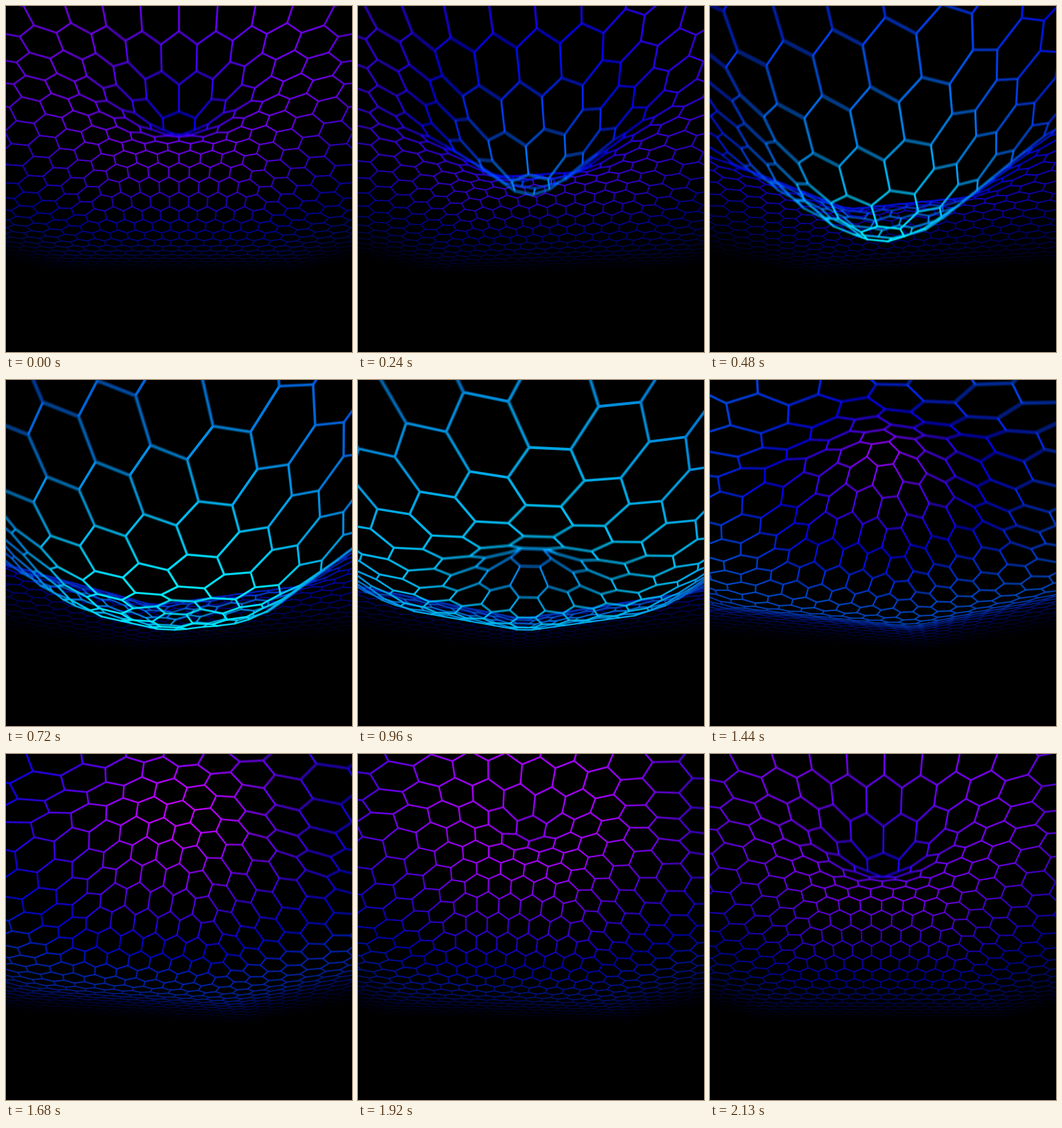
Recreate the animation shown at these times as an HTML page with a canvas. Size 500 px wide and 500 px high, loop 2160 ms.

```html
<!DOCTYPE html>
<html lang="en">
<head>
<meta charset="utf-8">
<title>Rippling honeycomb</title>
<style>
  html, body { margin: 0; width: 100%; height: 100%; overflow: hidden; background: #000; }
  canvas { display: block; width: 100vw; height: 100vh; }
</style>
</head>
<body>
<canvas id="stage" width="500" height="500"></canvas>
<script>
const SIZE = 500, STEPS = 72, STEP_MS = 30;
const RADIUS = 33;             // mesh radius, in hexagon sides
const FOCAL = 433;             // camera distance, px
const TILT = Math.PI / 3;
const SCALE = 27.15;           // px per hexagon side at the pivot
const LIFT = -2.18;            // pivot above the screen centre, in sides
const AMP = 4.95;              // wave height on screen, in sides
const SPREAD = 12.3;           // how far the wave carries, in sides
const LAG = 9.6 * Math.PI / 180; // wave phase per side
const SAMPLES = 3, SHUTTER = 0.3;

const cosT = Math.cos(TILT), sinT = Math.sin(TILT);

function newCanvas() {
  const c = document.createElement('canvas');
  c.width = c.height = SIZE;
  return c;
}

// Distance whose circles are hexagons with corners on the x axis.
const hexDist = (x, v) =>
  Math.max(Math.abs(v), Math.abs(x) * Math.sqrt(3) / 2 + Math.abs(v) / 2);

function makeVertex(x, v) {
  const d = hexDist(x, v);
  return { x, v, d, damp: Math.exp(-((d / SPREAD) ** 2)) };
}

// Each hexagon owns three of its six edges.
function buildEdges() {
  const edges = [], rows = Math.ceil(RADIUS / 1.5);
  for (let row = -rows; row <= rows; row++) {
    for (let col = -2 * rows; col <= 2 * rows; col++) {
      const cx = Math.sqrt(3) * (col + row / 2), cv = 1.5 * row;
      if (hexDist(cx, cv) > RADIUS) continue;
      const corner = i => {
        const a = Math.PI / 6 + i * Math.PI / 3;
        return makeVertex(cx + Math.cos(a), cv + Math.sin(a));
      };
      for (let i = 0; i < 3; i++) edges.push([corner(i), corner(i + 1)]);
    }
  }
  return edges;
}

function project(p, t) {
  const turn = t * Math.PI / 3, c = Math.cos(turn), s = Math.sin(turn);
  const x = p.x * c - p.v * s, v = p.x * s + p.v * c;
  const wave = Math.sin(2 * Math.PI * t - LAG * p.d) * p.damp;
  const h = AMP * wave;
  const depth = 1 / SCALE - (v * sinT + h * cosT / sinT) / FOCAL;
  return {
    x: SIZE / 2 + x / depth,
    y: SIZE / 2 + (LIFT - v * cosT + h) / depth,
    depth, wave
  };
}

// Full light in the middle, eased to black at the rim.
const glow = d => (1 + Math.cos(Math.PI * Math.min(1, d / RADIUS))) / 2;

const outside = (a, b) =>
  Math.max(a, b) < -5 || Math.min(a, b) > SIZE + 5;

function drawMesh(ctx, t) {
  ctx.fillStyle = '#000';
  ctx.fillRect(0, 0, SIZE, SIZE);
  ctx.lineCap = 'round';
  const lines = [];
  for (const [p, q] of edges) {
    const a = project(p, t), b = project(q, t);
    if (a.depth < 0.005 || b.depth < 0.005) continue;
    if (outside(a.x, b.x) || outside(a.y, b.y)) continue;
    const fade = glow((p.d + q.d) / 2);
    if (fade > 0.005) lines.push({ a, b, fade, depth: (a.depth + b.depth) / 2 });
  }
  lines.sort((m, n) => n.depth - m.depth);
  for (const { a, b, fade, depth } of lines) {
    const hue = 234 - 52 * (a.wave + b.wave) / 2;
    ctx.strokeStyle = `hsl(${hue.toFixed(1)}, 100%, ${(50 * fade).toFixed(1)}%)`;
    ctx.lineWidth = 1.2 + 0.045 / depth;
    ctx.beginPath();
    ctx.moveTo(a.x, a.y);
    ctx.lineTo(b.x, b.y);
    ctx.stroke();
  }
}

// Averages a few moments around the step for a short motion blur.
function render(step) {
  const out = newCanvas(), ctx = out.getContext('2d');
  for (let i = 0; i < SAMPLES; i++) {
    const shift = SHUTTER * (i / (SAMPLES - 1) - 0.5);
    drawMesh(layer, (step + shift) / STEPS);
    ctx.globalAlpha = 1 / (i + 1);
    ctx.drawImage(layer.canvas, 0, 0);
  }
  return out;
}

const edges = buildEdges();
const layer = newCanvas().getContext('2d');
const stage = document.getElementById('stage').getContext('2d');
const cache = [];
const start = performance.now();
let shown = -1;

function tick() {
  const elapsed = performance.now() - start;
  const step = Math.floor(elapsed / STEP_MS + 0.01) % STEPS;
  if (step !== shown) {
    cache[step] = cache[step] || render(step);
    stage.drawImage(cache[step], 0, 0);
    shown = step;
  }
  requestAnimationFrame(tick);
}
tick();
</script>
</body>
</html>
```
